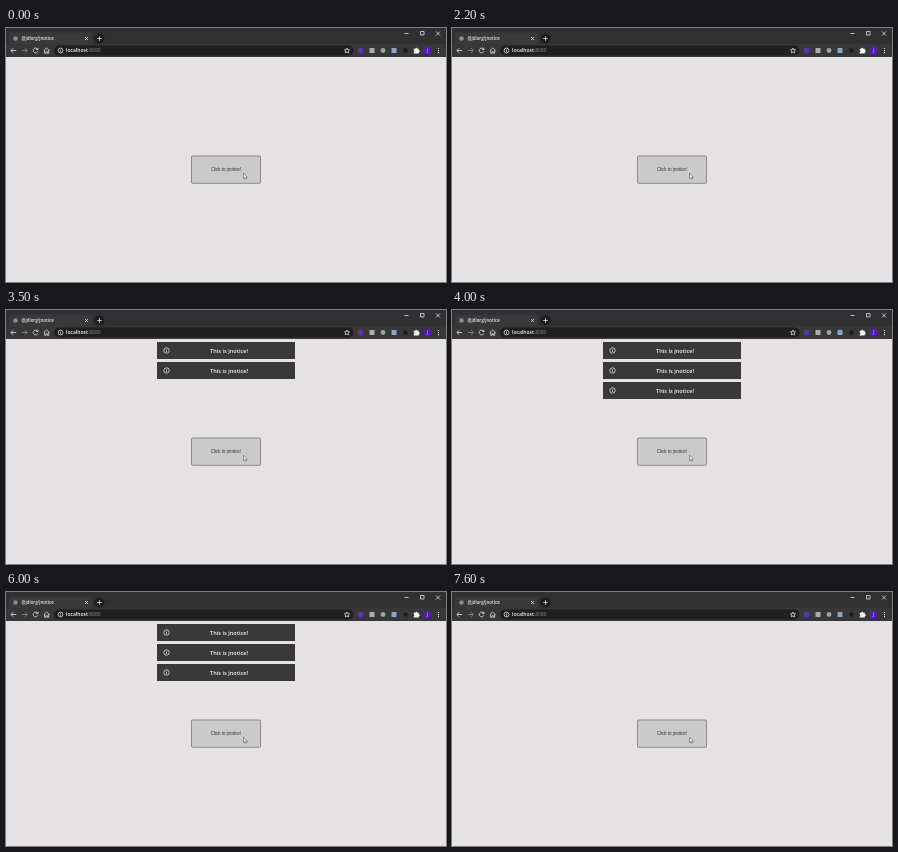
An HTML page for the animation above (7.7 s loop, 440 by 254 pixels).

```html
<!DOCTYPE html>
<html lang="en">
<head>
<meta charset="utf-8">
<title>Notice demo</title>
<style>
  html, body { margin: 0; width: 100%; height: 100%; overflow: hidden; background: #e4e2e3; }
  svg { display: block; width: 440px; height: 254px; }
  text { font-family: "Open Sans", "Noto Sans", sans-serif; }
  .line { fill: none; stroke: #e2e2e2; stroke-width: .8; }
  .dim { stroke: #8d8d8d; }
  .notice { opacity: 0; }
</style>
</head>
<body>
<svg viewBox="0 0 440 254">
  <rect width="440" height="254" fill="#e4e2e3"/>

  <g id="notices"></g>

  <!-- browser frame -->
  <rect width="440" height="29" fill="#373737"/>
  <rect width="440" height="16" fill="#303030"/>
  <path d="M1 16.5Q3 16 3 14V6.500Q3 4.500 5 4.500H84Q86 4.500 86 6.500V14Q86 16 88 16.500Z" fill="#393939"/>
  <circle cx="9.500" cy="10.500" r="2.300" fill="#85908c"/>
  <text x="15.500" y="12.200" font-size="4.400" font-weight="600" fill="#e8e8e8">@jdlorg/jnotice</text>
  <path class="line" d="M79 9l3 3m0-3l-3 3"/>
  <circle cx="93.500" cy="10.500" r="5" fill="#1d1d1d"/>
  <path class="line" d="M91.200 10.500h4.600M93.500 8.200v4.600"/>
  <path class="line" d="M398.500 5.500h4M414.500 3.500h3.500v3.500h-3.500zM430 3.500l4 4m0-4l-4 4"/>

  <!-- toolbar -->
  <path class="line" d="M10.200 22.500H5m2.300-2.400L4.900 22.500l2.400 2.400"/>
  <path class="line dim" d="M16 22.500h5.200m-2.300-2.400l2.400 2.400-2.400 2.400"/>
  <path class="line" d="M31.700 21.200A2.400 2.400 0 1 0 31.900 23.300M32 19.800v1.700h-1.800"/>
  <path class="line" d="M37.700 22.700L40.700 20l3 2.700M38.700 22.300v3h1.300v-1.600h1.400v1.600h1.300v-3"/>
  <rect x="48" y="17.500" width="299.500" height="10" rx="5" fill="#1f1f1f"/>
  <g class="line" stroke-width=".7">
    <circle cx="54.500" cy="22.500" r="2.400"/>
    <path d="M54.500 22.200v1.600M54.500 20.900v.6"/>
  </g>
  <text x="60" y="24.300" font-size="5" fill="#8b8b8b"><tspan fill="#f2f2f2" font-weight="600">localhost</tspan>:8080</text>
  <path class="line" d="M341 20l.8 1.700 1.800.2-1.300 1.200.3 1.800-1.600-.9-1.600.9.300-1.800-1.300-1.200 1.800-.2z" stroke-width=".6"/>
  <circle cx="354.500" cy="22.500" r="2.900" fill="#5632b5"/>
  <rect x="363.500" y="20" width="5" height="5" fill="#a9adab"/>
  <circle cx="377" cy="22.500" r="2.400" fill="#9aa6a1"/>
  <rect x="385.500" y="20" width="5" height="5" fill="#8fa3bd"/>
  <circle cx="399.500" cy="22.500" r="2.200" fill="#1c1c1c"/>
  <path d="M407.700 20.700h1.600a1 1 0 0 1 2 0h1.500v1.600a1 1 0 0 1 0 2v1.200h-5.100v-1.400a1 1 0 0 0 0-1.900z" fill="#f1f1f1"/>
  <circle cx="421.500" cy="22.500" r="4.100" fill="#4e20b4"/>
  <text x="421.500" y="24" font-size="4.500" text-anchor="middle" fill="#e9e1ff">j</text>
  <path d="M432.500 20v5.200" stroke="#e2e2e2" stroke-width="1.100" stroke-dasharray="1.100 .95"/>

  <!-- page -->
  <rect x="185.500" y="128" width="69" height="27.300" rx="1" fill="#cbcacb" stroke="#777" stroke-width=".8"/>
  <text x="220" y="143.300" font-size="4.500" text-anchor="middle" fill="#333"
        style="font-family:'Liberation Sans',sans-serif">Click to jnotice!</text>
  <path d="M237.600 145.300v5.300l1.200-1 .8 1.700.9-.4-.8-1.700h1.600z" fill="#fff" stroke="#333" stroke-width=".5"/>
</svg>
<script>
const LOOP = 7700, FADE = 250, PITCH = 20;
const shows = [2900, 3150, 3550];
const hides = [6050, 6300, 6700];
const layer = document.getElementById('notices');

const key = (time, y, opacity) =>
  ({ offset: time / LOOP, transform: `translateY(${y}px)`, opacity, easing: 'ease-out' });

shows.forEach((show, i) => {
  const g = document.createElementNS('http://www.w3.org/2000/svg', 'g');
  g.setAttribute('class', 'notice');
  g.innerHTML = `
    <rect x="151" y="32" width="138" height="17" fill="#393939"/>
    <circle cx="160.500" cy="40.500" r="2.700" class="line"/>
    <path d="M160.500 40.200v1.800M160.500 38.800v.7" class="line"/>
    <text x="223" y="42.600" font-size="5.600" font-weight="600" text-anchor="middle" fill="#f4f4f4">This is jnotice!</text>`;
  layer.append(g);

  // Later notices move up a row as each earlier one leaves.
  let y = i * PITCH;
  const keys = [key(0, y - PITCH, 0), key(show, y - PITCH, 0), key(show + FADE, y, 1)];
  for (const hide of hides.slice(0, i)) {
    keys.push(key(hide, y, 1), key(hide + FADE, y -= PITCH, 1));
  }
  keys.push(key(hides[i], y, 1), key(hides[i] + FADE, y - PITCH, 0), key(LOOP, y - PITCH, 0));
  g.animate(keys, { duration: LOOP, iterations: Infinity });
});
</script>
</body>
</html>
```
